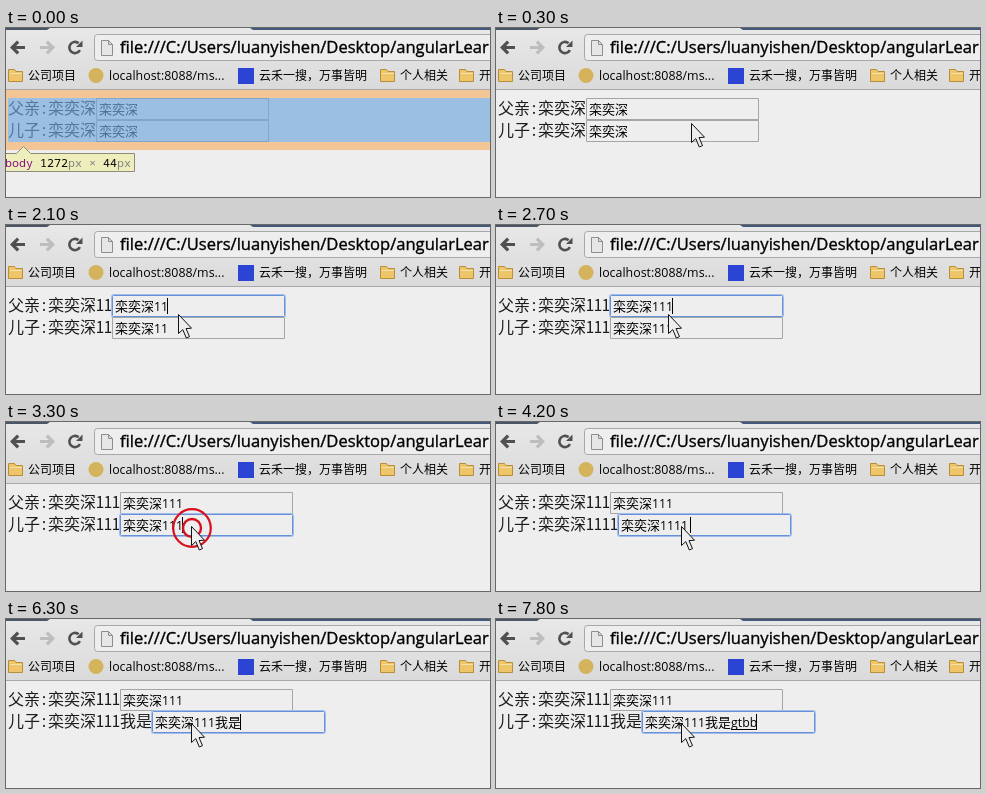
Write an HTML page with a canvas that moves like this. It is 484 by 169 pixels and loops after 8 s.

```html
<!DOCTYPE html>
<html lang="zh">
<head>
<meta charset="utf-8">
<title>Scope inheritance demo</title>
<style>
html, body { margin: 0; width: 100%; height: 100%; overflow: hidden; background: #eee; }
canvas { display: block; }
</style>
</head>
<body>
<canvas id="stage" width="484" height="169"></canvas>
<script>
const ctx = document.getElementById('stage').getContext('2d', { alpha: false });
const LOOP = 8000;
const PAGE = '#eeeeee';
const ICON = '#505050';
const NAME = '栾奕深';
const CJK = '"Noto Sans CJK SC", "Noto Sans CJK", sans-serif';
const MONO = '"Noto Sans Mono CJK SC", ' + CJK;
const UI = '"Open Sans", ' + CJK;

// Each step overrides the state left by the previous ones.
const steps = [
  { t: 0, parent: '', child: '', comp: '', focus: -1, caret: false, inspect: true, mouse: null, ring: false },
  { t: 300, inspect: false, mouse: [195, 95] },
  { t: 600, focus: 0, caret: true, mouse: [172, 89], ring: true },
  { t: 900, caret: false, ring: false },
  { t: 1500, caret: true },
  { t: 1800, parent: '1', child: '1' },
  { t: 2100, parent: '11', child: '11' },
  { t: 2700, parent: '111', child: '111' },
  { t: 3000, mouse: [184, 102] },
  { t: 3300, focus: 1, mouse: [185, 104], ring: true },
  { t: 3600, caret: false, ring: false },
  { t: 3900, child: '1111', caret: true },
  { t: 4200, child: '1111 ' },
  { t: 4500, caret: false },
  { t: 4800, child: '1111', caret: true },
  { t: 5100, child: '111' },
  { t: 5400, comp: 'g' },
  { t: 6000, child: '111我', comp: '' },
  { t: 6300, child: '111我是' },
  { t: 6600, caret: false },
  { t: 7200, comp: 'g', caret: true },
  { t: 7500, comp: 'gt' },
  { t: 7800, comp: 'gtbb' }
];

function stateAt(t) {
  return Object.assign({}, ...steps.filter(s => s.t <= t));
}

function rect(x, y, w, h, color) {
  ctx.fillStyle = color;
  ctx.fillRect(x, y, w, h);
}

function text(str, x, y, font, color = '#000') {
  ctx.font = font;
  ctx.fillStyle = color;
  ctx.fillText(str, x, y);
  return x + ctx.measureText(str).width;
}

function path(points, fill, stroke, width = 1) {
  ctx.beginPath();
  points.forEach(([x, y]) => ctx.lineTo(x, y));
  ctx.closePath();
  if (fill) { ctx.fillStyle = fill; ctx.fill(); }
  if (stroke) { ctx.strokeStyle = stroke; ctx.lineWidth = width; ctx.stroke(); }
}

function circle(x, y, r, color, width) {
  ctx.beginPath();
  ctx.arc(x, y, r, 0, Math.PI * 2);
  if (width) {
    ctx.strokeStyle = color;
    ctx.lineWidth = width;
    ctx.stroke();
  } else {
    ctx.fillStyle = color;
    ctx.fill();
  }
}

function roundBox(x, y, w, h, r, fill, stroke) {
  ctx.beginPath();
  ctx.roundRect(x, y, w, h, r);
  if (fill) { ctx.fillStyle = fill; ctx.fill(); }
  ctx.strokeStyle = stroke;
  ctx.lineWidth = 1;
  ctx.stroke();
}

// Latin and Chinese runs use different faces and sizes.
function mixed(str, x, y) {
  for (const run of str.match(/[\x20-\x7e]+|[^\x20-\x7e]+/g) || []) {
    x = text(run, x, y, run < '\x7f' ? `12.3px ${UI}` : `13px ${CJK}`);
  }
  return x;
}

function arrow(x, dir, color) {
  const p = (dx, dy) => [x + dx * dir, 19.5 + dy];
  path([p(0, 0), p(7, -7), p(9.3, -4.8), p(6, -1.5), p(15, -1.5),
        p(15, 1.5), p(6, 1.5), p(9.3, 4.8), p(7, 7)], color);
}

function reload() {
  ctx.beginPath();
  ctx.arc(69, 19.5, 5.6, 0.5, 5.4);
  ctx.strokeStyle = ICON;
  ctx.lineWidth = 2.6;
  ctx.stroke();
  path([[76.5, 12.5], [76.5, 19], [70, 19]], ICON);
}

function folder(x) {
  path([[x + .5, 53.5], [x + .5, 41.5], [x + 6.5, 41.5], [x + 8, 43.5],
        [x + 14.5, 43.5], [x + 14.5, 53.5]], '#eec569', '#b98e3a');
  rect(x + 2, 45, 12, 1, '#f4e2ac');
}

function browser() {
  const bar = ctx.createLinearGradient(0, 0, 0, 62);
  bar.addColorStop(0, '#e8e8e8');
  bar.addColorStop(1, '#dadada');
  rect(0, 0, 484, 62, bar);
  path([[0, 0], [44, 0], [41, 2], [0, 2]], '#4a5568');
  path([[244, 0], [484, 0], [484, 2], [247, 2]], '#44587c');

  arrow(4, 1, ICON);
  arrow(49, -1, '#bdbdbd');
  reload();
  roundBox(88.5, 6.5, 410, 26, 3, PAGE, '#a6a8aa');
  path([[95.5, 12.5], [102.5, 12.5], [106.5, 16.5], [106.5, 27.5], [95.5, 27.5]], '#e6e6e6', '#8e8e8e');
  path([[102.5, 12.5], [102.5, 16.5], [106.5, 16.5]], '#ddd', '#8e8e8e');
  const url = 'file:///C:/Users/luanyishen/Desktop/angularLear';
  text(url, 114, 24.5, `16.55px ${UI}`);
  ctx.lineWidth = .35;
  ctx.strokeStyle = '#000';
  ctx.strokeText(url, 114, 24.5);

  const small = `12px ${CJK}`;
  folder(2);
  text('公司项目', 22, 52, small);
  circle(90, 47.5, 7.5, '#d5b25c');
  text('localhost:8088/ms...', 103, 52, `12.4px ${UI}`);
  rect(232, 40, 16, 16, '#2c44d4');
  text('云禾一搜，万事皆明', 253, 52, small);
  folder(374);
  text('个人相关', 394, 52, small);
  folder(453);
  text('开发', 473, 52, small);
  rect(0, 61, 484, 1, '#a8a8a8');
}

function row(index, label, value, s) {
  const y = 70 + index * 22;
  const focused = s.focus === index;
  const comp = focused ? s.comp : '';
  const shown = value.trim();
  const wide = shown.replace(/[\x20-\x7e]/g, '').length;
  const x = 90 + 8 * (shown.length + wide);

  text(`${label}:${NAME}${shown}`, 2, y + 16, `300 16px ${MONO}`, '#1c1c1c');
  rect(x, y, 173, 22, PAGE);
  if (focused) {
    roundBox(x - .5, y - .5, 174, 23, 2, null, '#a3bdeb');
    roundBox(x + .5, y + .5, 172, 21, 1, null, '#6690da');
  } else {
    roundBox(x + .5, y + .5, 172, 21, 0, null, '#a5a5a5');
  }

  const start = mixed(NAME + value, x + 3, y + 16);
  const end = mixed(comp, start, y + 16);
  if (comp) rect(Math.round(start), y + 18, Math.round(end - start), 1, '#000');
  if (focused && s.caret) rect(Math.round(end - 1), y + 3, 1, 16, '#000');
}

function inspector() {
  const margin = 'rgba(246,178,107,.66)';
  rect(0, 62, 484, 8, margin);
  rect(0, 114, 484, 8, margin);
  rect(0, 70, 2, 44, margin);
  rect(2, 70, 482, 44, 'rgba(111,168,220,.66)');

  path([[-3, 125.5], [10.5, 125.5], [17.5, 118.5], [24.5, 125.5], [128.5, 125.5],
        [128.5, 143.5], [-3, 143.5]], '#eeeebc', '#8c8c78');
  const font = '11.67px "Noto Sans Mono", "DejaVu Sans Mono", monospace';
  let x = -1;
  for (const [str, color] of [['body ', '#881280'], ['1272', '#000'], ['px × ', '#808080'],
                              ['44', '#000'], ['px', '#808080']]) {
    x = text(str, x, 139, font, color);
  }
}

function pointer([x, y], ring) {
  if (ring) {
    circle(x + 1, y + 2, 18.8, '#d9101e', 2.2);
    circle(x + 1, y + 2, 9, '#d9101e', 2.4);
  }
  const shape = [[.5, .5], [.5, 19.5], [4.8, 15.6], [8.3, 24], [11.5, 22.6], [8, 14.6], [13.5, 14.2]];
  path(shape.map(([dx, dy]) => [x + dx, y + dy]), PAGE, '#111');
}

function draw(t) {
  const s = stateAt(t);
  rect(0, 0, 484, 169, PAGE);
  browser();
  row(0, '父亲', s.parent, s);
  row(1, '儿子', s.child, s);
  if (s.inspect) inspector();
  if (s.mouse) pointer(s.mouse, s.ring);
}

const began = performance.now();
function tick() {
  draw((performance.now() - began) % LOOP);
  requestAnimationFrame(tick);
}
tick();
</script>
</body>
</html>
```
